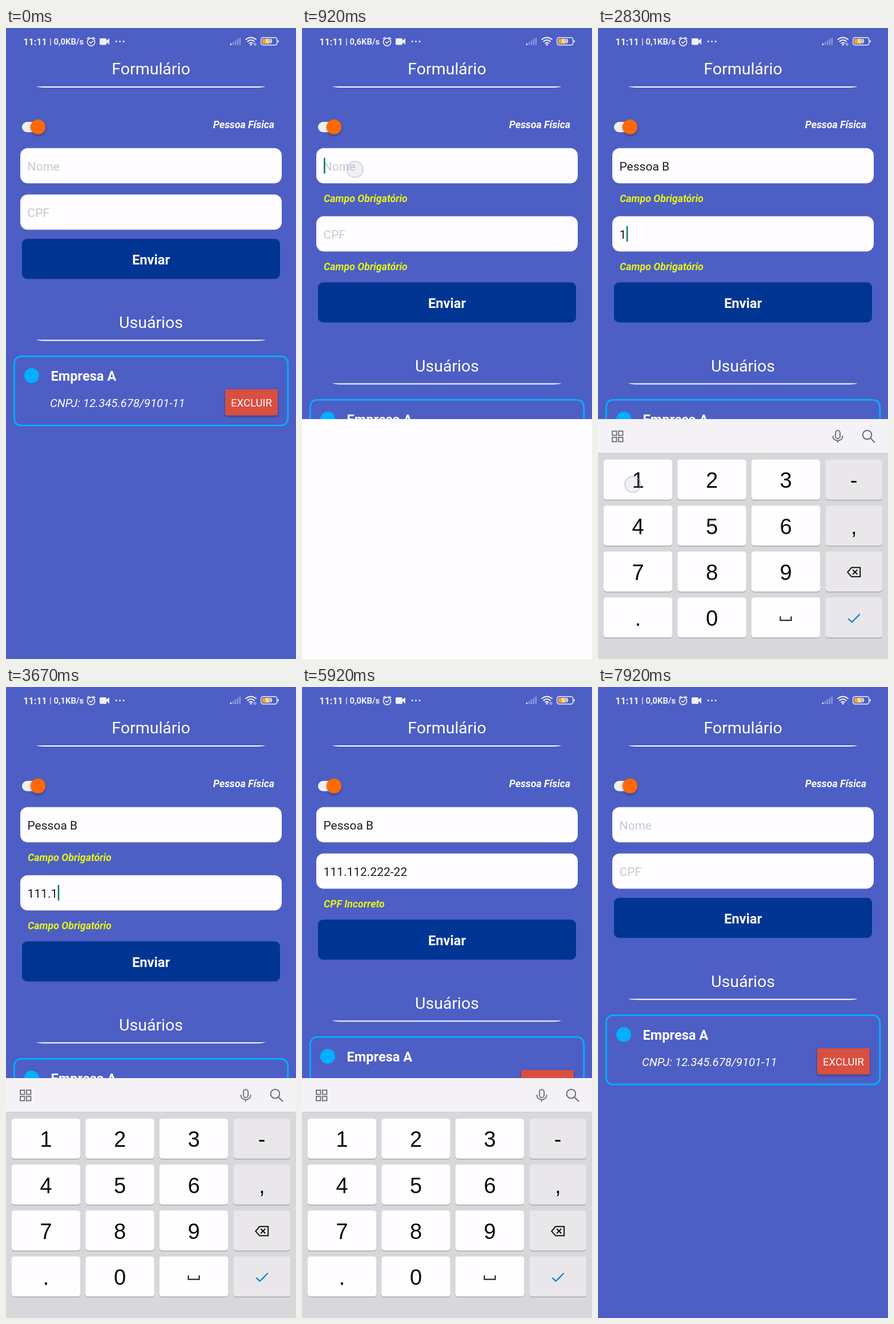
Animation, 508 px wide and 1102 px high, one loop 8000 ms. Source, as an HTML page:

```html
<!DOCTYPE html>
<html lang="pt-BR">
<head>
<meta charset="utf-8">
<title>Formulário</title>
<style>
  html, body { margin: 0; width: 100%; height: 100%; overflow: hidden; background: #4d5ec5; }
  svg { display: block; width: 100%; height: 100%; font-family: Roboto, sans-serif; }
  .keys { font-family: "Liberation Sans", Arial, sans-serif; }
  .bold { font-weight: 700; }
  .italic { font-style: italic; }
</style>
</head>
<body>
<svg id="stage" viewBox="0 0 508 1102"></svg>
<script>
const LOOP = 8000;
const WHITE = '#fffdff', CYAN = '#00b0ff', YELLOW = '#e3f41a', BLUE = '#1487cf';
const stage = document.getElementById('stage');
const pen = document.createElement('canvas').getContext('2d');

// Drawing helpers
const escapeText = s => s.replace(/&/g, '&amp;').replace(/</g, '&lt;');
const text = (x, y, size, fill, s, cls = '', anchor = 'start') =>
  `<text x="${x}" y="${y}" font-size="${size}" fill="${fill}" class="${cls}" text-anchor="${anchor}">${escapeText(s)}</text>`;
const centered = (x, y, size, fill, s, cls) => text(x, y, size, fill, s, cls, 'middle');
const rect = (x, y, w, h, r, fill, extra = '') =>
  `<rect x="${x}" y="${y}" width="${w}" height="${h}" rx="${r}" fill="${fill}" ${extra}/>`;
const circle = (x, y, r, fill, extra = '') => `<circle cx="${x}" cy="${y}" r="${r}" fill="${fill}" ${extra}/>`;
const path = (d, fill, extra = '') => `<path d="${d}" fill="${fill}" ${extra}/>`;
const line = (d, color, width, extra = '') =>
  path(d, 'none', `stroke="${color}" stroke-width="${width}" ${extra}`);
const group = (content, attrs) => `<g ${attrs}>${content}</g>`;
const move = (x, y, content) => group(content, `transform="translate(${x} ${y})"`);
const measure = s => { pen.font = '21px Roboto, sans-serif'; return pen.measureText(s).width; };

// Timeline, in ms
const SUBMIT_EMPTY = 330, FOCUS_NAME = 915, KEYBOARD = 1010, NAME_START = 1170, NAME_STEP = 84;
const FOCUS_CPF = 2200, NUMPAD = 2350, SUBMIT_PARTIAL = 4100, SUBMIT_FINAL = 6170, CLOSED = 6340;
const NAME = 'Pessoa B', DIGITS = '11111222222';
const nameTimes = [...NAME].map((_, i) => NAME_START + i * NAME_STEP);
const digitTimes = [...DIGITS].map((_, i) => i < 5 ? 2800 + i * 250 : 4620 + (i - 5) * 150);
const taps = [
  [170, 254, 405], [800, 93, 247], [2130, 90, 363], [3960, 262, 482], [5970, 262, 444],
  ...digitTimes.map((time, i) => [time - 30, i < 5 ? 61 : 200, 797, 110])
];
const countPast = (times, t) => times.filter(time => time <= t).length;

function formatCpf(digits) {
  const groups = digits.slice(0, 9).match(/\d{1,3}/g) || [];
  return groups.join('.') + (digits.length > 9 ? '-' + digits.slice(9) : '');
}

function touchRing(x, y) {
  return circle(x, y, 14, 'rgba(170,175,205,.16)', 'stroke="rgba(145,150,185,.36)" stroke-width="2"');
}

function statusBar(t) {
  const speed = t < 500 || t >= 5000 ? '0,0' : t < 2500 ? '0,6' : '0,1';
  const active = t < 500 || (t >= 2500 && t < 4500) || (t >= 5000 && t < 6500);
  const ink = '#f1f1fb';
  let out = text(30.5, 29.5, 16, ink, '11:11', 'bold') + text(76, 29, 14.8, ink, `| ${speed}KB/s`, 'bold');
  out += circle(149, 24.5, 6.6, 'none', `stroke="${ink}" stroke-width="1.6"`);
  out += line('M142 19l4-3M156 19l-4-3M146 24l2.5 2.5 4-4', ink, 1.6);
  out += rect(164, 18, 12, 11.5, 1.5, ink) + path('M176 22l5-4v11l-5-4z', ink);
  out += [193, 199.5, 206].map(x => circle(x, 23.5, 1.5, ink)).join('');
  for (let i = 0; i < 5; i++)
    out += rect(392.5 + i * 4, 27 - i * 2.6, 2.6, 3 + i * 2.6, 1, ink, `opacity="${i ? .38 : 1}"`);
  out += line('M419.500 20.500Q429 12.500 438.500 20.500M422.500 24Q429 18 435.500 24M425.500 27Q429 24 432.500 27', ink, 2);
  out += circle(429, 29, 1.7, ink);
  if (active) out += circle(436, 28.5, 1.8, 'none', `stroke="${ink}" stroke-width="1"`);
  out += rect(446.7, 16.7, 28, 13, 3.5, 'none', `stroke="${ink}" stroke-width="1.5"`);
  out += rect(449, 19, 13, 8.5, 1, '#f5a62e') + rect(476, 21, 1.7, 4.5, .8, ink);
  return out + centered(460.5, 27.3, 10.5, '#fff', '59', 'bold');
}

function heading(label, baseline) {
  const y = baseline + 21;
  return centered(254, baseline, 28.5, '#fff', label) +
    path(`M53 ${y}H455Q450 ${y + 1.9} 441 ${y + 1.9}H67Q58 ${y + 1.9} 53 ${y}z`, '#fff');
}

function field(y, hint, value, caretOn, composing) {
  let out = rect(25, y, 458, 61.5, 13, WHITE);
  out += text(37.5, y + 39, 21, value ? '#1d1d1f' : '#c9c8cd', value || hint);
  if (composing && value) {
    const start = value.lastIndexOf(' ') + 1;
    out += rect(38 + measure(value.slice(0, start)), y + 40, measure(value.slice(start)), 1.3, 0, '#222');
  }
  if (caretOn) out += rect(38 + measure(value), y + 17, 2.6, 27.5, 0, '#0b7f74');
  return out;
}

const errorLabel = (y, s) => text(38, y + 94, 17.8, YELLOW, s, 'bold italic');

function userCard() {
  return rect(14.4, 573.4, 479.4, 120.8, 12, 'none', `stroke="${CYAN}" stroke-width="2.8"`) +
    circle(45, 607, 13, CYAN) +
    text(78.500, 616, 23.6, '#fff', 'Empresa A', 'bold') +
    text(77, 662, 20.3, '#fff', 'CNPJ: 12.345.678/9101-11', 'italic') +
    rect(384, 631, 92, 45.5, 3, '#d94f41', 'filter="url(#lift)"') +
    centered(430, 661, 18.5, '#fff', 'EXCLUIR');
}

function form(t) {
  const open = t < SUBMIT_FINAL;
  const name = open ? NAME.slice(0, countPast(nameTimes, t)) : '';
  const cpf = open ? formatCpf(DIGITS.slice(0, countPast(digitTimes, t))) : '';
  const nameError = t >= SUBMIT_EMPTY && t < SUBMIT_PARTIAL;
  const cpfError = t >= SUBMIT_EMPTY && open;
  const cpfY = nameError ? 329 : 291;
  const shift = 38 * (nameError + cpfError);
  const lastEdit = Math.max(...[FOCUS_NAME, FOCUS_CPF, ...nameTimes, ...digitTimes].filter(time => time <= t));
  const caret = open && t >= FOCUS_NAME && Math.floor((t - lastEdit) / 500) % 2 === 0;
  const onName = t < FOCUS_CPF;

  let out = heading('Formulário', 81);
  out += rect(28, 164, 36, 18, 9, '#f2eff3') + circle(56, 172.8, 13, '#ff6900', 'filter="url(#lift)"');
  out += text(470, 175, 17.8, '#fff', 'Pessoa Física', 'bold italic', 'end');
  out += field(209.7, 'Nome', name, caret && onName, onName);
  if (nameError) out += errorLabel(209.7, 'Campo Obrigatório');
  out += field(cpfY - .3, 'CPF', cpf, caret && !onName);
  if (cpfError) out += errorLabel(cpfY, nameError ? 'Campo Obrigatório' : 'CPF Incorreto');
  out += move(0, shift,
    rect(28, 368.2, 452, 70, 9, '#003593') + centered(254, 412.5, 23.7, '#fff', 'Enviar', 'bold') +
    heading('Usuários', 523.5) + userCard());
  return out;
}

// Keyboard parts
const key = (x, y, w, h, fill = WHITE) => rect(x, y + 1.5, w, h, 5, '#a9a8ad') + rect(x, y, w, h, 5, fill);
const check = (x, y) => line(`M${x - 10} ${y + 1}l6.500 6 14-14`, BLUE, 2.2);
const backspace = (x, y) =>
  line(`M${x - 11} ${y}l7-8h15v16h-15zM${x - 2} ${y - 4}l8 8m0-8l-8 8`, '#111', 2);
const mic = (x, y, k, color) => group(
  rect(-4, -10, 8, 14, 4, 'none', `stroke="${color}" stroke-width="2"`) +
  line('M-8.500-1v1.500a8.500 7 0 0 0 17 0V-1M0 7.500V11', color, 2),
  `transform="translate(${x} ${y}) scale(${k})"`);
const search = circle(471.5, 710.5, 7.8, 'none', 'stroke="#6c6b70" stroke-width="2"') +
  line('M477 716l8 8', '#6c6b70', 2);
const board = rect(0, 742, 508, 360, 0, '#d8d7da') + rect(0, 683, 508, 59.5, 0, '#f4f2f5') +
  rect(0, 742, 508, 1, 0, '#cccbcf');

const rows = [
  { y: 755, h: 41, x: 8, keys: '1234567890', hints: '' },
  { y: 813.5, h: 47, x: 8, keys: 'QWERTYUIOP', hints: '%\\|=[]<>{}' },
  { y: 878.5, h: 47, x: 33, keys: 'ASDFGHJKL', hints: '@#$_&-+()' },
  { y: 943.5, h: 47, x: 83, keys: 'ZXCVBNM', hints: '*"\':;!?' }
];

function people() {
  return circle(335.5, 706.500, 7.5, '#1f6f9f') + path('M322 728v-3q1-8 10-9h7q9 1 10 9v3z', '#1f6f9f') +
    circle(410, 703.500, 3.6, '#8a4b2b') + path('M407 707h6l2 11h-8z', '#f7931e') +
    line('M408 709l-5 7M413 709l4 6', '#f7931e', 2.4) +
    line('M409 717l-4 10M412 717l4 10', '#23639b', 3);
}

function letterKeyboard(pressed) {
  let out = board + centered(75, 723, 26, '#69686d', 'E') + centered(223, 723, 26, '#69686d', 'Que');
  out += [149, 298, 372.5].map(x => rect(x, 698, 1, 29, 0, '#dcdbe0')).join('') + people() + search;
  let popup = '';
  for (const row of rows) [...row.keys].forEach((label, i) => {
    const x = row.x + i * 50.1, mid = x + 21, down = label === pressed;
    out += key(x, row.y, 42, row.h, down ? '#bab9bd' : WHITE);
    out += centered(mid, row.y + row.h / 2 + 10.5, 28, down ? '#77767a' : '#0b0b0c', label);
    if (row.hints) out += centered(x + 32, row.y + 11.5, 11.5, '#8c8b90', row.hints[i]);
    if (down) {
      out += touchRing(mid, row.y + 23);
      popup = circle(mid, row.y - 46, 37, WHITE, 'filter="url(#lift)"') +
        centered(mid, row.y - 34.5, 33, '#0b0b0c', label);
    }
  });
  const grey = '#e9e7ea';
  out += key(8, 943.5, 62, 47, grey) + line('M39 977v-17m-8 8l8-8 8 8', BLUE, 2.2);
  out += key(438, 943.5, 62, 47, grey) + backspace(469, 968);
  out += key(8, 1008.5, 67, 53, grey) + centered(41.5, 1042.5, 17.6, '#111', '?123');
  out += key(83, 1008.5, 42, 53, grey) + circle(104, 1036, 9.5, 'none', 'stroke="#111" stroke-width="1.900"') +
    circle(100.5, 1033, 1.5, '#111') + circle(107.5, 1033, 1.5, '#111') + line('M99 1038q5 6 10 0', '#111', 1.8);
  out += key(133, 1008.5, 42, 53, grey) + centered(154, 1046, 28, '#111', ',') + mic(164, 1017, .55, '#333');
  out += key(183, 1008.5, 192, 53, pressed === ' ' ? '#cfced2' : WHITE) +
    centered(279, 1041, 14, '#111', 'Português (Brasil)') +
    path('M208 1036l6-4.500v9zM350 1036l-6-4.500v9z', '#111');
  out += circle(363, 1019.5, 5.7, 'none', 'stroke="#444" stroke-width="1"') +
    line('M357.500 1017.500h11m-11 4h11M363 1014q-5 5.500 0 11q5-5.500 0-11', '#444', 1);
  out += key(383, 1008.5, 42, 53, grey) + centered(404, 1046, 28, '#111', '.') +
    centered(416, 1020, 11.5, '#222', '!?');
  out += key(433, 1008.5, 67, 53, grey) + check(466.5, 1036);
  return out + popup;
}

function numberPad() {
  let out = board + search + mic(420, 713, 1, '#77767b');
  for (const [x, y] of [[25, 704], [36, 704], [25, 715], [36, 715]])
    out += rect(x, y, 7.5, 7.5, 0, 'none', 'stroke="#68676c" stroke-width="1.700"');
  ['123-', '456,', '789<', '.0_>'].forEach((labels, r) => [...labels].forEach((label, c) => {
    const x = 9.7 + c * 129.5, y = 753.7 + r * 80.3, w = c < 3 ? 120.5 : 100, mid = x + w / 2;
    out += key(x, y, w, 70, c < 3 ? WHITE : '#e9e7ea');
    if (label === '<') out += backspace(mid, y + 36);
    else if (label === '>') out += check(mid, y + 36);
    else if (label === '_') out += line(`M${mid - 9.5} ${y + 33}v7h19v-7`, '#111', 2);
    else out += centered(mid, y + 49.5, 38, '#0b0b0c', label);
  }));
  return out;
}

function keyboard(t) {
  if (t < FOCUS_NAME || t >= CLOSED) return '';
  if (t < KEYBOARD) return rect(0, 683, 508, 419, 0, WHITE);
  const typed = countPast(nameTimes, t);
  const pressed = typed && t - nameTimes[typed - 1] < 140 ? NAME[typed - 1].toUpperCase() : '';
  const content = t < NUMPAD ? letterKeyboard(pressed) : numberPad();
  const slide = Math.max(0, (t - SUBMIT_FINAL) / (CLOSED - SUBMIT_FINAL));
  return group(content, `class="keys" transform="translate(0 ${(slide * slide * 420).toFixed(1)})"`);
}

const base = `<defs><filter id="lift" x="-30%" y="-30%" width="160%" height="170%">
  <feDropShadow dx="0" dy="2" stdDeviation="2" flood-opacity=".35"/></filter></defs>` +
  rect(0, 0, 508, 1102, 0, '#4d5ec5');

function scene(t) {
  const rings = taps.filter(([time, , , hold = 150]) => t >= time && t < time + hold)
    .map(([, x, y]) => touchRing(x, y)).join('');
  return base + statusBar(t) + form(t) + keyboard(t) + rings;
}

const began = performance.now();
let shown = '';
function tick() {
  const next = scene((performance.now() - began) % LOOP);
  if (next !== shown) stage.innerHTML = shown = next;
  requestAnimationFrame(tick);
}
tick();
</script>
</body>
</html>
```
